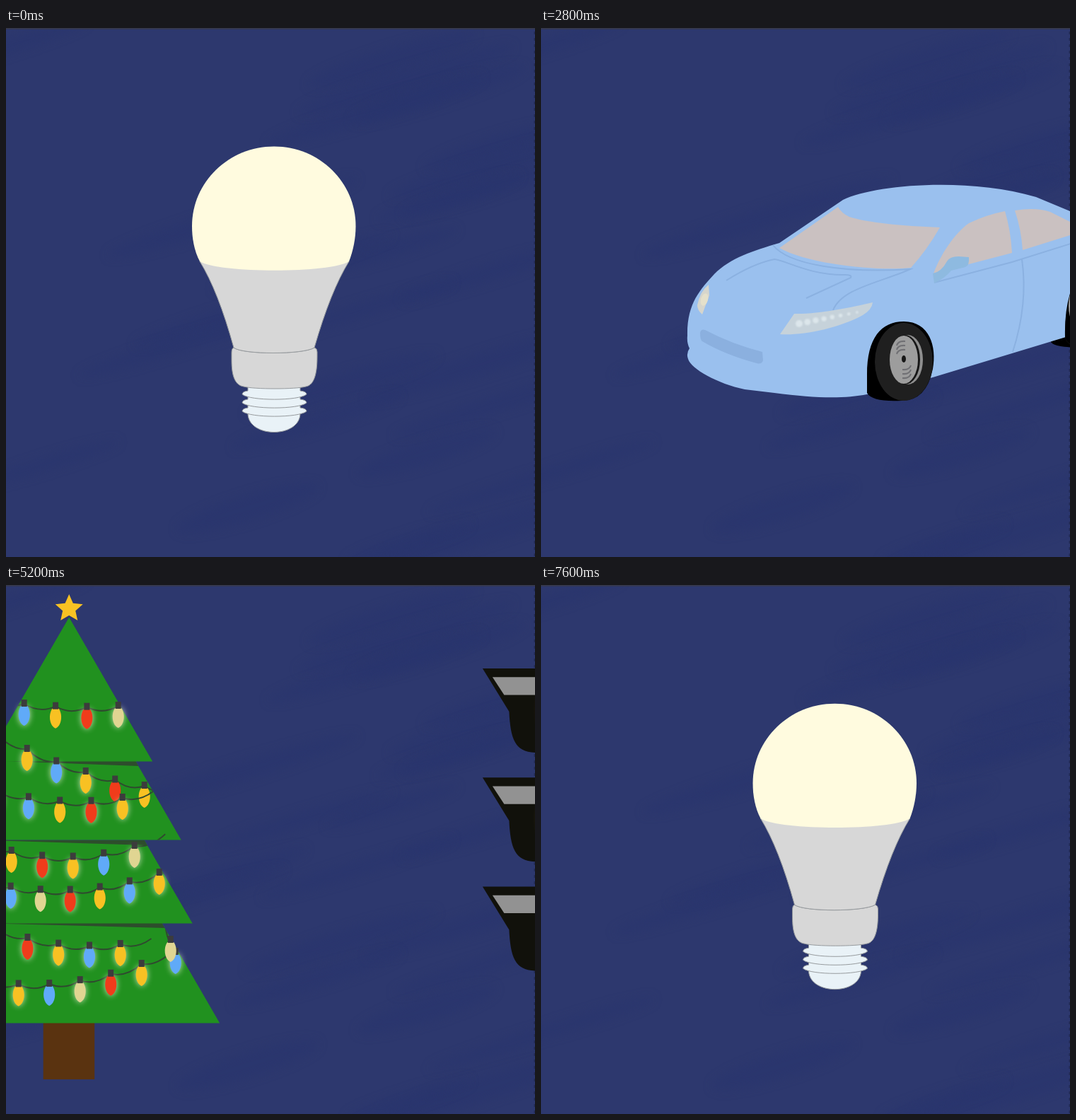
An HTML page with a canvas that plays this animation: 748 by 748 pixels, repeating every 7700 ms.

```html
<!DOCTYPE html>
<html lang="en">
<head>
<meta charset="utf-8">
<title>Lights</title>
<style>
html, body { margin: 0; width: 100%; height: 100%; overflow: hidden; background: #2c376d; }
canvas { display: block; width: 748px; height: 748px; }
</style>
</head>
<body>
<canvas id="stage" width="748" height="748"></canvas>
<script>
const SIZE = 748, LOOP = 7700, STEP = 100;
const SPEED = 0.487, DRIFT = 0.0022;
let ctx = document.getElementById('stage').getContext('2d');

function fill(d, color) {
  ctx.fillStyle = color;
  ctx.fill(new Path2D(d));
}
function line(d, color, width = 1) {
  ctx.strokeStyle = color;
  ctx.lineWidth = width;
  ctx.stroke(new Path2D(d));
}
function both(d, color, edge) {
  fill(d, color);
  line(d, edge);
}
function oval(x, y, rx, ry, color, turn = 0) {
  ctx.fillStyle = color;
  ctx.beginPath();
  ctx.ellipse(x, y, rx, ry, turn, 0, Math.PI * 2);
  ctx.fill();
}
function rect(x, y, w, h, color) {
  ctx.fillStyle = color;
  ctx.fillRect(x, y, w, h);
}
function soft(blur, draw) {
  ctx.save();
  ctx.filter = `blur(${blur}px)`;
  draw();
  ctx.restore();
}

// Flat blue with broad, faint brush strokes
function paintSky() {
  const layer = document.createElement('canvas');
  layer.width = layer.height = SIZE;
  const main = ctx;
  ctx = layer.getContext('2d');
  rect(0, 0, SIZE, SIZE, '#2d386e');
  let seed = 7;
  const random = () => (seed = seed * 16807 % 2147483647) / 2147483647;
  soft(7, () => {
    for (let i = 0; i < 26; i++)
      oval(random() * SIZE, (i + random()) * SIZE / 26, 90 + random() * 100, 8 + random() * 10, 'rgba(40,52,110,.5)', -0.3);
  });
  rect(0, 0, SIZE, 2, '#343850');
  for (let y = 5; y < SIZE; y += 9) rect(746.5, y, 1.5, 4, '#222b56');
  ctx = main;
  return layer;
}

function drawBulb() {
  const edge = '#969a9d', screw = '#e9f2f7', base = '#d7d7d7';
  both('M342 508V546C344 580 414 580 416 546V508', screw, edge);
  for (let y = 542; y > 515; y -= 12)
    both(`M342 ${y - 5}Q334 ${y - 4} 334 ${y}C345 ${y + 9.5} 414 ${y + 9.5} 425 ${y}Q425 ${y - 4} 416 ${y - 5}`, screw, edge);
  rect(343, 507, 72, 8, screw);
  both('M322 452Q319 453 319 459V470C319 490 323 505 336 507C350 511 410 511 424 507C437 505 440 485 440 465V458Q440 453 436 452C420 462 335 462 322 452Z', base, edge);
  both('M274 330Q300 372 322 452C335 462 420 462 436 452Q459 372 485 330Z', base, edge);
  fill('M274 330C266 315 263 297 263 280C263 218 315 167.5 379 167.5C443 167.5 494.5 218 494.5 280C494.5 297 491 315 485 330C460 347 300 347 274 330Z', '#fffbdf');
}

// A layer of the light cone: narrow at the lamp, rounded at the bottom
function cone(bottom, color, spread = 0) {
  const depth = bottom - 213;
  const l = 322 - depth * 0.4065 - spread, r = 418 + depth * 0.4 + spread;
  const y = bottom - 14, mid = 180 + (y - 180) * 0.45;
  const a = l + (318 - l) * 0.22, b = r - (r - 408) * 0.22;
  fill(`M${l} ${y}Q${a} ${mid} 318 180Q340 164 365 164Q395 164 408 180Q${b} ${mid} ${r} ${y}Q${r} ${bottom} ${r - 14} ${bottom}H${l + 14}Q${l} ${bottom} ${l} ${y}Z`, color);
}

function drawStreetLamp() {
  soft(14, () => {
    oval(372, 657, 252, 52, '#39437a');
    cone(605, '#414b7e', 8);
  });
  soft(8, () => {
    oval(371, 640, 233, 40, '#404a7d');
    cone(590, '#475082');
  });
  fill('M150 640C152 560 588 560 590 640Q588 661 565 661H175Q152 659 150 640Z', '#4a5383');
  for (let k = 8; k >= 0; k--) {
    const fade = (k / 8) ** 1.7;
    cone(213 + 5.9 * k + 5.03 * k * k, `rgb(${147 - 72 * fade},${153 - 69 * fade},${183 - 52 * fade})`);
  }
  fill('M187 628C205 560 535 560 552 628Z', '#5a628d');

  fill('M568 114L567 430Q566 570 558 618Q582 625 609 617Q609 600 602 545Q594 480 594 430L593.5 114Z', '#989898');
  fill('M568 415Q580 520 588 621Q570 622 558 618Q566 570 567 430Z', '#a0a09f');
  oval(581, 114, 12.5, 4, '#868686');
  fill('M393 147C450 103 525 100 569 147L580 153V166Q574 163 569 158C530 118 460 118 399 157Z', '#8d8d8d');
  fill('M312 182L398 156C397 166 382 175 360 181Q328 190 312 182Z', '#f9f3d0');
  fill('M312 182L313 170C328 153 345 144 369 142Q395 141 398 156Z', '#2b2b2b');
}

function hub(x, y) {
  oval(x + 6, y, 21, 35, '#8f8f8f');
  oval(x + 2, y, 21, 35, '#171717');
  oval(x, y, 20, 34, '#9d9d9d');
  for (const side of [-1, 1]) {
    for (let r = 12; r < 27; r += 6) {
      const sy = y + side * r;
      line(`M${x + side * 10} ${sy - side * 4}Q${x + side * 8} ${sy + side * 3} ${x - side * 2} ${sy + side * 2}`, '#707074', 2);
    }
  }
  oval(x, y - 1, 3, 5, '#171717');
}

function drawCar() {
  const blue = '#9ac0ee', crease = '#8bb1e1', glass = '#cac1c1';
  oval(752, 443, 31, 8.5, '#000');
  fill('M427 243C470 222 600 210 700 239L748 259Q770 266 796 267Q803 268 802 274Q802 279 808 286C813 292 811 302 817 312Q823 322 823 345C823 380 816 402 803 408L760 432L742 437L554 494L461 518C430 524 390 524 330 516L288 511C250 503 212 482 208 468Q205 460 210 453Q206 445 207 435C206 390 225 370 245 348C268 325 300 315 337 304Z', blue);
  fill('M337 311L420 253Q425 262 436 267C460 275 510 280 564 282Q545 315 523 339C480 344 380 335 337 311Z', glass);
  fill('M555 347C565 320 585 290 605 276Q630 264 656 259Q664 285 666 318Z', glass);
  fill('M670 258Q700 253 720 260L750 275L748 293L681 314Q679 285 670 258Z', glass);
  line('M556 360L666 331L749 305V293', crease, 2);
  line('M680 327Q689 390 667 458', crease, 2);
  line('M328 307C350 335 430 347 522 341C480 360 425 368 413 399', crease, 2);
  line('M262 357Q300 333 330 327C345 328 380 350 430 349Q440 349 438 353L375 382', crease, 2);
  fill('M556 361L554 347Q566 345 574 330Q578 323 590 323L605 324Q606 336 600 338L580 343Q572 353 556 361Z', '#8ebae0');
  fill('M338 433L358 404C390 405 440 395 469 388Q468 398 455 406C420 425 370 435 338 433Z', '#c6d2da');
  soft(1, () => {
    for (let i = 0; i < 8; i++) oval(365 + i * 11.7, 418 - i * 2.3, 5 - i * 0.45, 5 - i * 0.45, '#dce6eb');
  });
  fill('M221 392Q225 372 237 363L238 378L228 405Q221 399 221 392Z', '#d5d5cd');
  oval(231, 384, 5, 9, '#e4e0cb', 0.3);
  fill('M225 431Q226 425 232 427Q270 447 313 458L314 470Q312 476 305 474Q260 462 228 443Q225 441 225 431Z', '#8bb0df');

  fill('M461 516V490C461 438 481 415 513 415C549 415 560 450 554 482Q545 527 510 527Q468 529 461 516Z', '#000');
  oval(513, 472, 41, 55, '#1f1f1f');
  hub(513, 469);
  fill('M741 437C741 390 752 349 775 349C797 350 805 375 803 408Q797 451 762 451Q744 450 741 437Z', '#1f1f1f');
  fill('M741 437Q740 400 749 372Q745 422 762 451Q745 450 741 437Z', '#000');
  hub(766, 393);
}

const GLASS = { b: '#60aaf8', y: '#f8c123', r: '#f03c1b', w: '#e0d592' };
// Colours in order (capital = glowing), first light, last light, sag between them
const strings = [
  ['ByRW', 464, 186, 597, 189, 3],
  ['YBYry', 468, 250, 634, 302, 6],
  ['WByRY', 426, 308, 603, 319, 10],
  ['yRYbW', 446, 394, 620, 387, 12],
  ['YBwRyBY', 403, 436, 655, 425, 19],
  ['YRYBY', 425, 503, 600, 526, 11],
  ['YrYbWRY', 369, 570, 630, 554, 20],
  ['Bw', 678, 537, 671, 520, 0]
];

function fairyLight(x, y, key) {
  ctx.save();
  ctx.translate(x, y);
  const drop = 'M-4.5 -13C-11 -4 -8 12 0 15C8 12 11 -4 4.5 -13Z';
  if (key < 'a') {
    ctx.shadowColor = 'rgba(255,255,235,.75)';
    ctx.shadowBlur = 9;
  }
  fill(drop, GLASS[key.toLowerCase()]);
  ctx.shadowBlur = 0;
  rect(-4, -22, 8, 10, '#3c3c3c');
  ctx.restore();
}

// All tiers share one slope; the shade is a thin wedge under the tier above
function tier(mid, top, bottom, half) {
  const inner = half - (bottom - top) * 0.579;
  return {
    body: `M${mid - inner} ${top}H${mid + inner}L${mid + half} ${bottom}H${mid - half}Z`,
    shade: `M${mid - inner} ${top}H${mid + inner}L${mid + inner + 4} ${top + 7}Z`
  };
}
const tiers = [
  tier(528.5, 480, 621.5, 212), tier(525.5, 363, 480.5, 176.5),
  tier(528.5, 251, 362.5, 157.5), tier(527.5, 48, 251.5, 118)
];

function drawStar(x, y, outer, inner) {
  ctx.fillStyle = '#f7c223';
  ctx.beginPath();
  for (let i = 0; i < 10; i++) {
    const r = i % 2 ? inner : outer, a = i * Math.PI / 5 - Math.PI / 2;
    ctx.lineTo(x + r * Math.cos(a), y + r * Math.sin(a));
  }
  ctx.fill();
}

function drawTree() {
  rect(491, 620, 72.5, 81, '#5a3310');
  tiers.forEach(({ body, shade }, i) => {
    fill(body, '#21911f');
    if (i < 3) fill(shade, '#2d4d2c');
  });
  drawStar(527.5, 35.5, 20.5, 9.5);

  const outline = new Path2D(tiers.map(t => t.body).join(''));
  for (const [keys, x0, y0, x1, y1, sag] of strings) {
    const n = keys.length - 1;
    const spot = i => {
      const u = i / n;
      return [x0 + (x1 - x0) * u, y0 + (y1 - y0) * u + 4 * sag * u * (1 - u)];
    };
    // The wire runs one light past each end and is cut off by the tree's edge
    let wire = '', px, py;
    for (let i = -1; i <= n + 1; i++) {
      const [x, y] = spot(i);
      wire += wire ? `Q${(px + x) / 2} ${(py + y) / 2 - 4} ${x} ${y - 16}` : `M${x} ${y - 16}`;
      [px, py] = [x, y];
    }
    ctx.save();
    ctx.clip(outline);
    line(wire, '#2f4a2f', 2);
    ctx.restore();
    [...keys].forEach((key, i) => fairyLight(...spot(i), key));
  }
}

function halo(y, rgb, alpha) {
  const g = ctx.createRadialGradient(256.5, y, 70, 256.5, y, 96);
  g.addColorStop(0, `rgba(${rgb},${alpha})`);
  g.addColorStop(1, `rgba(${rgb},0)`);
  oval(256.5, y, 96, 96, g);
}

function drawTrafficLight() {
  const black = '#11110b', grey = '#929292', gap = 154.3;
  const visor = y => {
    fill(`M89.5 ${y}H166V${y + 119}C135 ${y + 119} 129 ${y + 100} 127 ${y + 61}Z`, black);
    fill(`M103.5 ${y + 12.3}H167V${y + 37.5}H120Z`, grey);
  };
  for (let i = 0; i < 3; i++) {
    visor(115.3 + gap * i);
    ctx.save();
    ctx.translate(509, 0);
    ctx.scale(-1, 1);
    visor(115.3 + gap * i);
    ctx.restore();
  }
  fill('M197 89C200 56 308 56 310 89Z', black);
  fill('M200 569C205 602 308 602 313 569Z', black);
  rect(228.5, 593, 52.5, 104, black);
  rect(235.5, 596, 12, 100, grey);
  both('M165.5 88.5H342V570H165.5Z', black, '#24241f');
  halo(174, '255,110,10', 0.16);
  halo(174 + gap, '255,180,40', 0.23);
  [['#b58069', '#ff3b00'], ['#b3a06c', '#f8c226'], ['#999', '#2c710c']].forEach(([ring, color], i) => {
    oval(256.5, 174 + gap * i, 71.5, 71.5, ring);
    oval(256.5, 174 + gap * i, 65, 65, color);
  });
}

// Each thing in the row with the moment it stands at its drawn place
const row = [
  [drawBulb, 0], [drawStreetLamp, 1400], [drawCar, 2800],
  [drawTree, 4300], [drawTrafficLight, 6400], [drawBulb, 7675]
];
const sky = paintSky();

function render(t) {
  ctx.drawImage(sky, 0, 0);
  for (const [draw, home] of row) {
    const dx = (home - t) * SPEED;
    if (Math.abs(dx) > 900) continue;
    ctx.save();
    ctx.translate(dx, (home - t) * DRIFT);
    draw();
    ctx.restore();
  }
}

let last = -1;
function tick(now) {
  const t = Math.floor((now % LOOP) / STEP) * STEP;
  if (t !== last) render(last = t);
  requestAnimationFrame(tick);
}
render(0);
requestAnimationFrame(tick);
</script>
</body>
</html>
```
